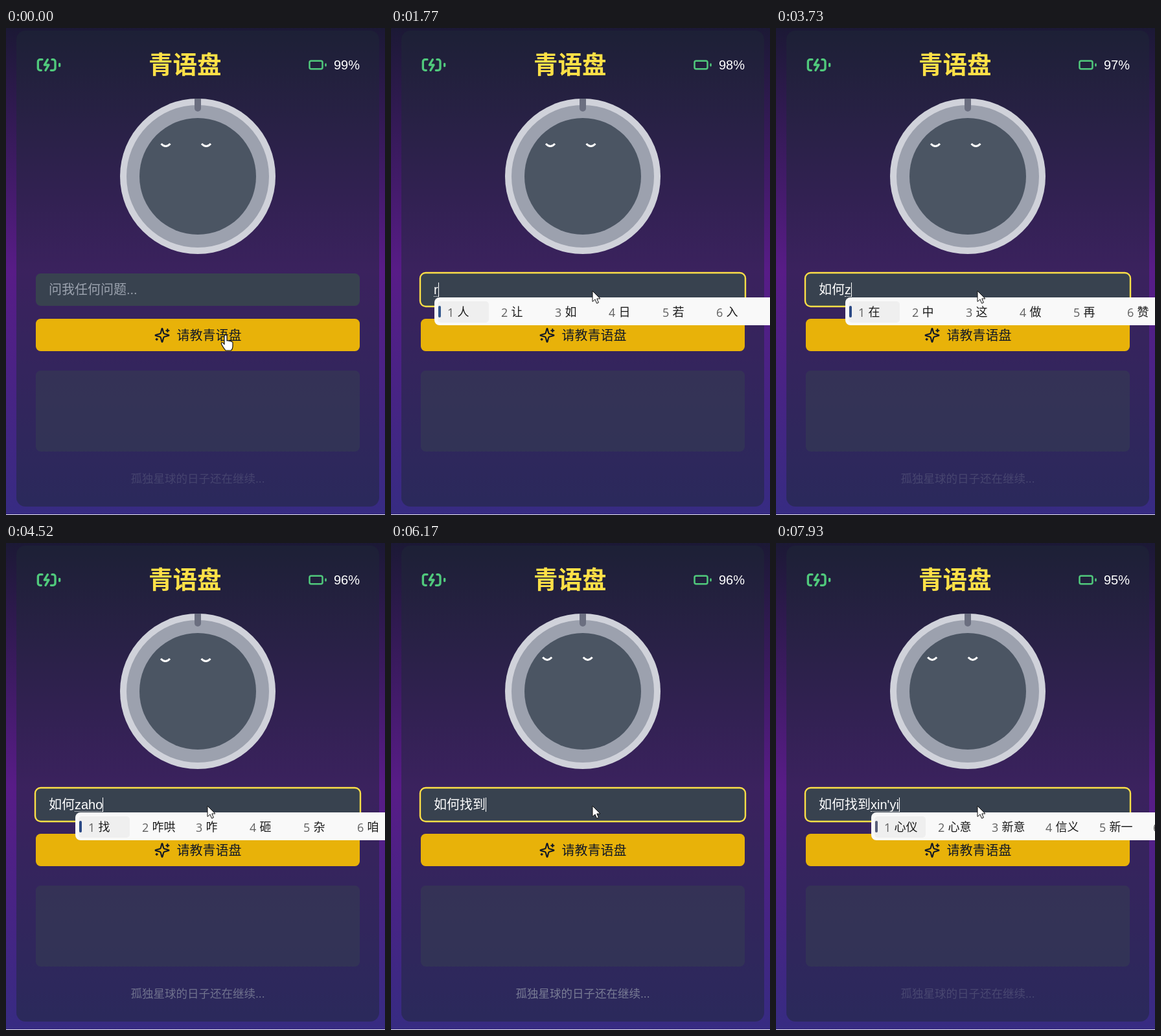
These frames come from a looping animation (585 px wide and 752 px high, 8 s). An HTML page:

```html
<!DOCTYPE html>
<html lang="zh-CN">
<head>
<meta charset="utf-8">
<title>青语盘</title>
<style>
html, body { margin: 0; width: 100%; height: 100%; overflow: hidden; }
#stage { position: relative; width: 585px; height: 752px; overflow: hidden; }
svg { position: absolute; left: 0; top: 0; }
text, #field, #ime { font-family: "Liberation Sans", "Noto Sans CJK SC", "Noto Sans CJK", sans-serif; }
#field {
  position: absolute; left: 66px; top: 393px; height: 22px; display: flex;
  font-size: 20px; line-height: 22px; color: #fff; white-space: pre;
}
#comp { box-sizing: border-box; height: 22px; border-bottom: 1px dotted #fff; }
#caret { width: 1px; height: 22px; background: #fff; }
#hint { color: #9ca3af; }
#ime {
  position: absolute; top: 416px; width: 640px; height: 43px; border-radius: 8px;
  background: #f9f9f9; font-size: 18px; line-height: 46px; white-space: pre;
}
#ime i { position: absolute; left: 5px; top: 6px; width: 79px; height: 33px; border-radius: 5px; background: #efefef; }
#ime u { position: absolute; left: 6px; top: 13px; width: 4px; height: 18px; border-radius: 2px; }
#ime span { position: absolute; top: 0; color: #1b1b1b; }
#ime span.n { color: #606060; font-family: "Open Sans", sans-serif; }
</style>
</head>
<body>
<div id="stage">
  <svg width="585" height="752" fill="none">
    <defs>
      <linearGradient id="sky" gradientUnits="userSpaceOnUse" x1="0" y1="-66" x2="0" y2="816">
        <stop offset="0" stop-color="#111827"/>
        <stop offset=".5" stop-color="#581c87"/>
        <stop offset="1" stop-color="#312e81"/>
      </linearGradient>
    </defs>
    <rect width="585" height="752" fill="url(#sky)"/>
    <rect y="751" width="585" height="1" fill="#e6e4ee"/>
    <rect x="16" y="4" width="560" height="735" rx="14" fill="#1f2937" fill-opacity=".5"/>

    <g stroke="#50c97c" stroke-width="2" stroke-linecap="round" stroke-linejoin="round">
      <path transform="translate(46 37) scale(1.6667)" d="M15 7h1a2 2 0 0 1 2 2v6a2 2 0 0 1-2 2h-2M6 7H4a2 2 0 0 0-2 2v6a2 2 0 0 0 2 2h1M11 7l-3 5h4l-3 5M22 11v2"/>
      <path transform="translate(466 42) scale(1.25)" d="M4 7h12a2 2 0 0 1 2 2v6a2 2 0 0 1-2 2H4a2 2 0 0 1-2-2V9a2 2 0 0 1 2-2zM22 11v2"/>
    </g>
    <text x="276.3" y="70" font-size="37.5" font-weight="700" text-anchor="middle" fill="#fde047">青语盘</text>
    <text id="level" x="546" y="64" font-size="20" text-anchor="end" fill="#fff"></text>

    <circle cx="296" cy="229" r="120" fill="#d0d2da"/>
    <circle cx="296" cy="229" r="110" fill="#9ca1ae"/>
    <circle cx="296" cy="229" r="90" fill="#4b5563"/>
    <path d="M291 109h10v15a5 5 0 0 1-10 0z" fill="#6b6f80"/>
    <path id="eyes" d="M-7-2.2Q0 5.4 7-2.2M55.5-2.2Q62.5 5.4 69.5-2.2" stroke="#fff" stroke-width="3"/>

    <rect x="46" y="379" width="500" height="50" rx="7.5" fill="#38424f"/>
    <rect id="ring" x="45" y="378" width="502" height="52" rx="8.5" stroke="#fde047" stroke-width="2.4"/>
    <rect x="46" y="449" width="500" height="50" rx="7.5" fill="#e8b209"/>
    <path transform="translate(228.5 462) scale(1.0417)" stroke="#111827" stroke-width="2" stroke-linecap="round" stroke-linejoin="round"
      d="M9.937 15.5A2 2 0 0 0 8.5 14.063l-6.135-1.582a.5.5 0 0 1 0-.962L8.5 9.936A2 2 0 0 0 9.937 8.5l1.582-6.135a.5.5 0 0 1 .963 0L14.063 8.5A2 2 0 0 0 15.5 9.937l6.135 1.581a.5.5 0 0 1 0 .964L15.5 14.063a2 2 0 0 0-1.437 1.437l-1.582 6.135a.5.5 0 0 1-.963 0zM20 3v4M22 5h-4M4 17v2M5 18H3"/>
    <text x="263.5" y="482" font-size="20" fill="#111827">请教青语盘</text>
    <rect x="46" y="529" width="500" height="125" rx="7.5" fill="#374151" fill-opacity=".5"/>
    <text id="note" x="296" y="702" font-size="17.5" text-anchor="middle" fill="#9ca3af">孤独星球的日子还在继续...</text>
  </svg>

  <div id="field"><span id="done"></span><span id="comp"></span><span id="caret"></span><span id="hint">问我任何问题...</span></div>
  <div id="ime"><i></i><u id="bar"></u></div>

  <svg width="585" height="752">
    <g id="mouse" stroke-linejoin="round">
      <path id="hand" fill="#fff" stroke="#111" stroke-width="1.2"
        d="M-2 2Q-2 0 0 0Q2 0 2 2V9q2-1 3.5.5q2-.8 3.3.8q2.2-.3 2.2 2V17Q11 22 8 24H0Q-4 19-6 15q-1.5-3 .5-3.5q1.5 0 3.5 3z"/>
      <path id="arrow" fill="#fff" stroke="#111" d="M0 0V16.5L4 13l2.6 6.2 2.8-1.2L6.8 12H12z"/>
      <path id="beam" fill="none" stroke="#10131c" d="M-3.5-8.5h3l.5.5.5-.5h3M0-8V8M-3.5 8.5h3L0 8l.5.5h3"/>
    </g>
  </svg>
</div>
<script>
const LOOP = 8000, FOCUS = 770, TYPING = 1540;
const $ = id => document.getElementById(id);

// time, committed text, composition, candidates
const steps = [
  [0, '', '', ''],
  [TYPING, '', 'r', '人 让 如 日 若 入 热'],
  [2000, '', 'ru', '如 入 乳 儒 汝 茹 辱'],
  [2400, '', 'ru\'h', '如何 入会 入户 如火 乳化 入伙 如画'],
  [2620, '', 'ru\'he', '如何 如和 汝河 入河 入核 入盒 乳鸽'],
  [2880, '如何', '', ''],
  [3610, '如何', 'z', '在 中 这 做 再 赞'],
  [3860, '如何', 'za', '杂 咋 砸 扎 咱 匝'],
  [4200, '如何', 'zah', '咋 砸 杂 咱 扎 匝'],
  [4480, '如何', 'zaho', '找 咋哄 咋 砸 杂 咱'],
  [4960, '如何', 'zaho\'d', '找到 找的 咋 砸 杂 咱'],
  [5290, '如何', 'zaho\'da', '找大 咋哄 咋 砸 杂 咱'],
  [5400, '如何', 'zaho\'dao', '找到 咋哄 咋 砸 杂 咱'],
  [5640, '如何找到', '', ''],
  [6535, '如何找到', 'x', '下 先 想 小 向 新'],
  [7000, '如何找到', 'xi', '系 西 洗 喜 细 希'],
  [7360, '如何找到', 'xin', '新 心 信 辛 欣 薪'],
  [7600, '如何找到', 'xin\'y', '心仪 心意 新意 信用 新颖 心眼'],
  [7850, '如何找到', 'xin\'yi', '心仪 心意 新意 信义 新一 信意']
];
const accents = ['#34588e', '', '#2c4a86', '', '#585e78'];

const mouseKeys = [[20, 339, 474], [180, 334, 462], [330, 324, 438], [480, 316, 416], [640, 312, 406], [720, 312, 405]];
const eyeKeys = [[0, 246.5, 181], [300, 246, 181], [5280, 246, 181], [5440, 241.2, 178.8]];
const noteKeys = [[0, .22], [1530, .22], [1700, 0], [1900, 0], [2030, .06], [3600, .06], [3700, .22],
  [4400, .6], [6165, .6], [6170, .68], [6990, .68], [7110, .25]];

function tween(keys, t) {
  const i = keys.findIndex(k => k[0] > t);
  if (i < 0) return keys[keys.length - 1].slice(1);
  if (i === 0) return keys[0].slice(1);
  const a = keys[i - 1], b = keys[i], p = (t - a[0]) / (b[0] - a[0]);
  return a.slice(1).map((v, j) => v + (b[j + 1] - v) * p);
}

const show = (id, on) => { $(id).style.display = on ? '' : 'none'; };

function cell(text, x, cls) {
  const s = document.createElement('span');
  s.textContent = text;
  s.style.left = x + 'px';
  s.className = cls;
  $('ime').append(s);
}

let current;
function setStep(step) {
  if (step === current) return;
  current = step;
  const [, done, comp, words] = step;
  $('done').textContent = done;
  $('comp').textContent = comp;
  show('comp', comp);
  show('hint', !done && !comp);
  show('ime', words);
  $('ime').querySelectorAll('span').forEach(s => s.remove());
  if (!words) return;
  $('ime').style.left = 67 + done.length * 20 + 'px';
  $('bar').style.background = accents[done.length];
  words.split(' ').forEach((w, i) => {
    cell(i + 1, 20 + i * 83, 'n');
    cell(w, 35.5 + i * 83, '');
  });
}

function draw(t) {
  setStep(steps.filter(s => s[0] <= t).pop());
  $('level').textContent = 99 - Math.floor((t + 1660) / 2000) + '%';
  $('note').setAttribute('opacity', tween(noteKeys, t)[0]);
  $('eyes').setAttribute('transform', `translate(${tween(eyeKeys, t)})`);

  show('ring', t >= FOCUS);
  $('caret').style.visibility = t >= FOCUS ? 'visible' : 'hidden';
  $('caret').style.marginRight = '-1px';

  const typing = t >= TYPING;
  const [x, y] = typing ? [311, 406] : tween(mouseKeys, t).map(Math.round);
  const kind = typing ? 'arrow' : y >= 449 ? 'hand' : y < 429 ? 'beam' : 'arrow';
  ['hand', 'arrow', 'beam'].forEach(k => show(k, k === kind));
  $('mouse').setAttribute('transform', `translate(${x} ${y})`);
}

const start = performance.now();
function tick() {
  draw((performance.now() - start) % LOOP);
  requestAnimationFrame(tick);
}
tick();
</script>
</body>
</html>
```
